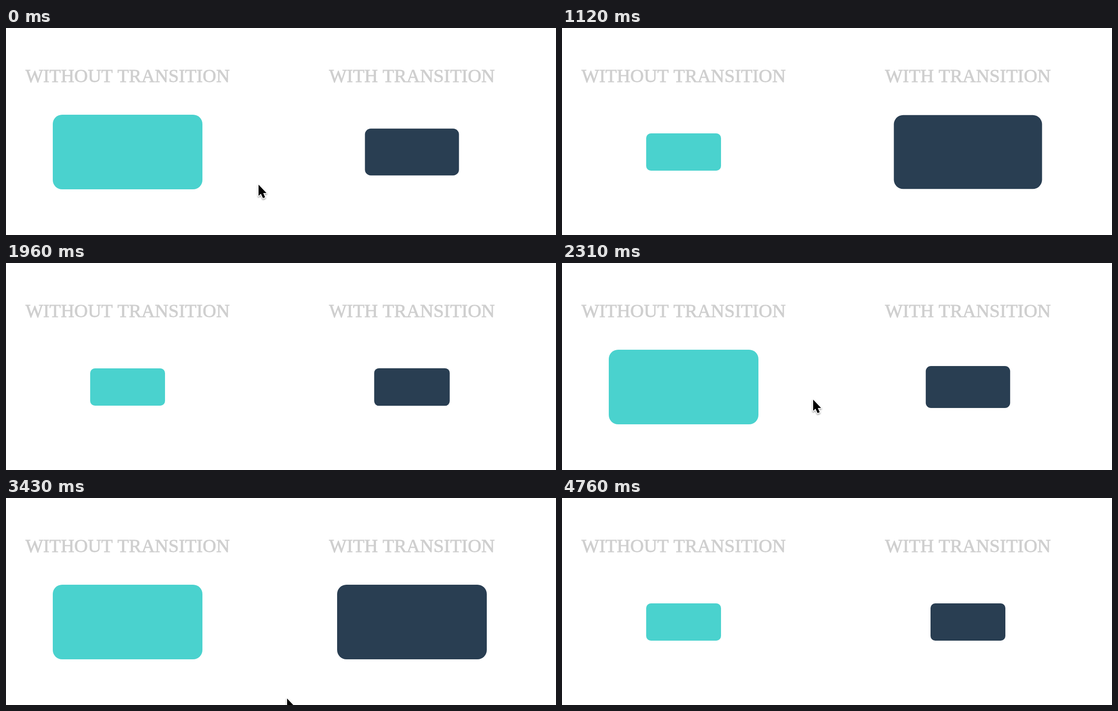
Animation of 1176x444 px, one loop 5040 ms. Source, as an HTML page:

```html
<!DOCTYPE html>
<html lang="en">
<head>
<meta charset="utf-8">
<title>Transition comparison</title>
<style>
  html, body { margin: 0; width: 100%; height: 100%; overflow: hidden; background: #fff; }
  svg { display: block; width: 100vw; height: 100vh; }
  text {
    font: 40px "Liberation Serif", "Times New Roman", serif;
    font-kerning: none;
    text-anchor: middle;
    fill: #cfcfcf;
    stroke: #cfcfcf;
    stroke-width: .9;
  }
  #pointer { filter: drop-shadow(0 2px 1.5px rgba(0, 0, 0, .38)); }
</style>
</head>
<body>
<svg viewBox="0 0 1176 444">
  <text x="260" y="116">WITHOUT TRANSITION</text>
  <text x="868" y="116">WITH TRANSITION</text>
  <rect id="instant" x="-80" y="-40" width="160" height="80" rx="10" fill="#4ad2ce"/>
  <rect id="smooth" x="-80" y="-40" width="160" height="80" rx="10" fill="#293e52"/>
  <g id="pointer">
    <path d="M0 0V24L5 19.5L9.5 29L14 27L10 18H17Z"
          fill="#000" stroke="#fff" stroke-width="3.4" paint-order="stroke" stroke-linejoin="round"/>
  </g>
</svg>
<script>
const LOOP = 5040, STEP = 70, DURATION = 1000;
const [instant, smooth, pointer] =
  ['instant', 'smooth', 'pointer'].map(id => document.getElementById(id));

// Each hover lasts from enter to exit; x, y is where the pointer tip rests.
const visits = [
  { enter: -183, exit: 1086, x: 540, y: 336 },
  { enter: 2190, exit: 3600, x: 537, y: 291 }
];

const bezier = (u, a, b) => 3 * u * (1 - u) ** 2 * a + 3 * u * u * (1 - u) * b + u ** 3;

// cubic-bezier(.25, .1, .25, 1), the CSS "ease" curve
function ease(p) {
  if (p <= 0) return 0;
  if (p >= 1) return 1;
  let low = 0, high = 1;
  for (let i = 0; i < 24; i++) {
    const mid = (low + high) / 2;
    if (bezier(mid, .25, .25) < p) low = mid; else high = mid;
  }
  return bezier(low, .1, 1);
}

function placeBox(box, x, scale) {
  box.setAttribute('transform', `translate(${x} 266) scale(${scale})`);
}

// The pointer glides up from below, rests, then accelerates away downwards.
function placePointer(t, visit) {
  const arrival = 70 * Math.exp((visit.enter + 50 - t) / 20);
  const departure = Math.max(0, (t - visit.exit + 380) / 210) ** 2;
  const x = visit.x + 64 * departure;
  const y = visit.y + arrival + 139 * departure;
  pointer.setAttribute('transform', `translate(${x} ${y})`);
}

function draw(t) {
  const visit = visits.filter(v => v.enter <= t).pop();
  const hovered = t < visit.exit;
  const progress = ease((t - (hovered ? visit.enter : visit.exit)) / DURATION);
  placeBox(instant, 260, hovered ? 2 : 1);
  placeBox(smooth, 868, hovered ? 1 + progress : 2 - progress);
  placePointer(t, visit);
}

const origin = performance.now();
function tick() {
  const t = (performance.now() - origin) % LOOP;
  draw(Math.floor(t / STEP) * STEP);
  requestAnimationFrame(tick);
}
tick();
</script>
</body>
</html>
```
